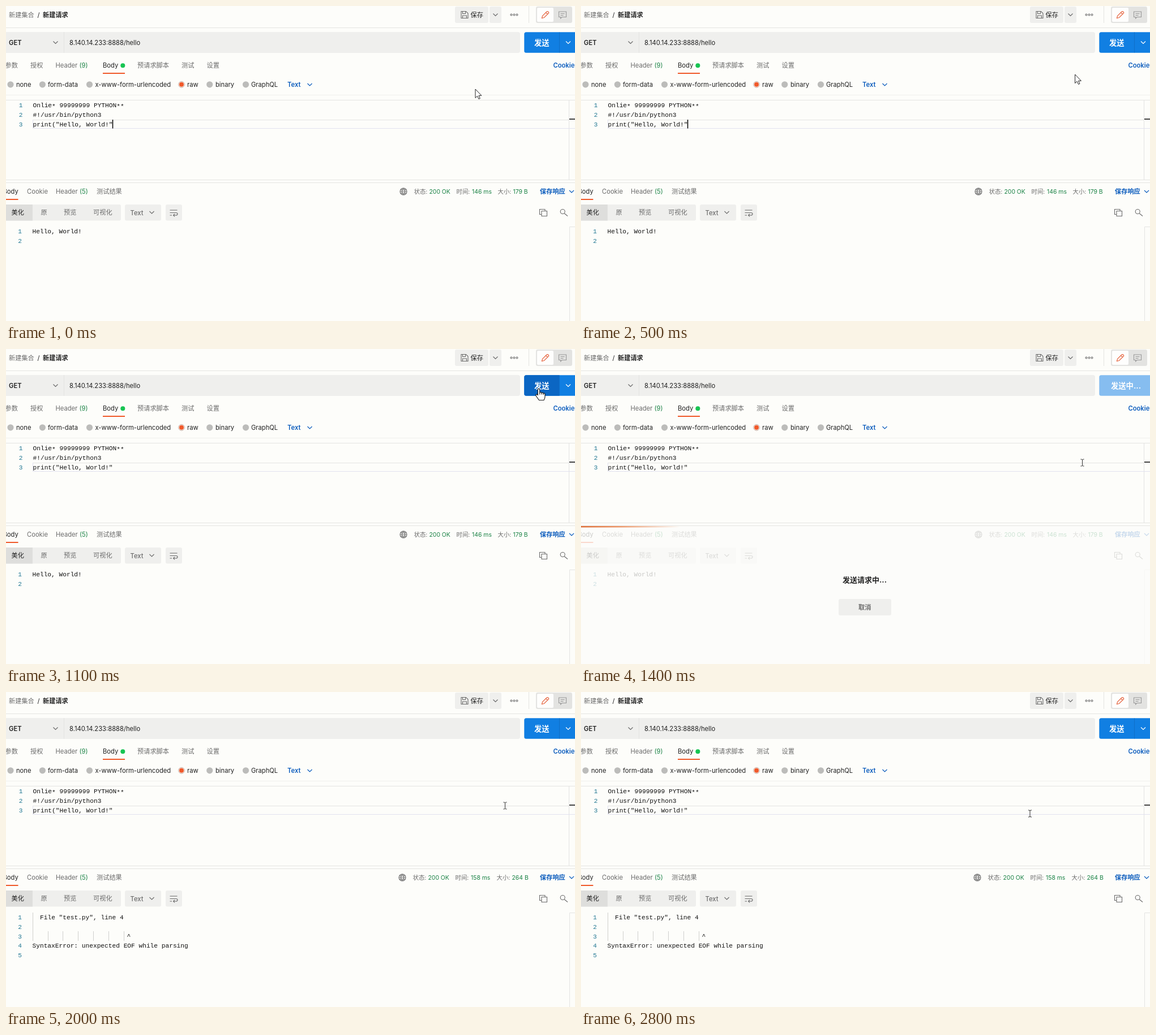
Animation, 1005 px wide and 557 px high, one loop 2900 ms. Source, as an HTML page:

```html
<!DOCTYPE html>
<html lang="zh-CN">
<head>
<meta charset="utf-8">
<style>
html, body { margin: 0; width: 100%; height: 100%; overflow: hidden; background: #fdfdfa; }
svg { display: block; width: 1005px; height: 557px; }
text { font: 11.2px Inter, "Noto Sans CJK SC", "Noto Sans CJK", sans-serif; fill: #6b6b6b; white-space: pre; }
.dark { fill: #212121; }
.bold { font-weight: 600; }
.blue { fill: #0b5cbd; font-weight: 600; }
.green { fill: #1a8245; }
.big { font-size: 13.3px; font-weight: 700; }
.white { fill: #fff; }
.small text { font-size: 10.4px; }
.code text { font: 11.2px "Liberation Mono", monospace; fill: #111; }
.code .num { fill: #237893; text-anchor: end; }
.line { stroke: #e4e4e2; fill: none; }
.icon { stroke: #6b6b6b; fill: none; stroke-width: 1.1; }
.panel { fill: #efefed; }
.orange { fill: #f0592a; }
</style>
</head>
<body>
<svg viewBox="0 0 1005 557">
  <defs>
    <path id="chev" d="M-4-2L0 2L4-2" fill="none" stroke-width="1.2"/>
    <linearGradient id="glow">
      <stop offset="0" stop-color="#e0713a"/>
      <stop offset=".4" stop-color="#ee9a6c"/>
      <stop offset="1" stop-color="#fdfdfa"/>
    </linearGradient>
  </defs>

  <!-- title row -->
  <text x="5" y="20">新建集合</text>
  <text x="55.5" y="20" class="dark">/</text>
  <text x="65" y="20" class="dark bold">新建请求</text>
  <rect x="793" y="1" width="59" height="29" rx="3" class="panel"/>
  <rect x="854" y="1" width="21" height="29" rx="3" class="panel"/>
  <path class="icon" d="M804 9.500H812.500L816 13V21.500H804ZM806.500 9.500V13.500H811.500V9.500M806.500 21.500V17H813.500V21.500"/>
  <text x="820.500" y="19.500" class="dark">保存</text>
  <use href="#chev" x="864.500" y="15.500" stroke="#6b6b6b"/>
  <g class="icon"><circle cx="892.500" cy="15.500" r="1.500"/><circle cx="897.500" cy="15.500" r="1.500"/><circle cx="902.500" cy="15.500" r="1.500"/></g>
  <path class="line" d="M923.500 0V30M0 38.500H1005"/>
  <rect x="936" y="1" width="64" height="29" rx="3" fill="#e3e3e1"/>
  <rect x="938" y="3" width="29" height="25" rx="2" fill="#fefefd"/>
  <path class="icon" style="stroke:#e5603a" d="M946.500 21.500L947.500 17.500L955 10Q956.500 9 958 10.500T958 13L950.500 20.500ZM953.500 11.500L956.500 14.500"/>
  <path class="icon" style="stroke:#999" d="M976.500 10H989.500V19.500H982L979.500 22V19.500H976.500ZM979.500 13.500H986.500M979.500 16.500H984.500"/>

  <!-- address row -->
  <rect x="-4" y="46" width="912" height="37" rx="4" class="panel"/>
  <path class="line" d="M102.500 46V83"/>
  <text x="5" y="69" class="dark bold">GET</text>
  <use href="#chev" x="87.500" y="64.500" stroke="#6b6b6b"/>
  <text x="112" y="68.500" class="dark">8.140.14.233:8888/hello</text>
  <g id="ready">
    <rect x="915.300" y="46.300" width="94" height="36.500" rx="3.500" fill="#117fe2"/>
    <path id="hover" d="M919 46.300H977V82.800H919Q915.300 82.800 915.300 79V50Q915.300 46.300 919 46.300" fill="#0b66c3"/>
    <path d="M977.500 46.500V82.500" stroke="#0f6fc8"/>
    <text x="933" y="69.500" class="big white">发送</text>
    <use href="#chev" x="993" y="64.500" stroke="#fff"/>
  </g>
  <g id="busy">
    <rect x="915.300" y="46.300" width="94" height="36.500" rx="3.500" fill="#86bdf0"/>
    <text x="936" y="69.500" class="big white">发送中...</text>
  </g>

  <!-- request tabs -->
  <text x="-1.400" y="109">参数</text>
  <text x="43" y="109">授权</text>
  <text x="87.500" y="109">Header <tspan class="green">(9)</tspan></text>
  <text x="171" y="109" class="dark">Body</text>
  <circle cx="206.300" cy="105.300" r="4" fill="#18c453"/>
  <text x="232" y="109">预请求脚本</text>
  <text x="310" y="109">测试</text>
  <text x="354.500" y="109">设置</text>
  <text x="966.500" y="109" class="blue">Cookie</text>
  <rect x="171" y="118" width="39" height="2" class="orange"/>

  <g fill="#bcbcba">
    <circle cx="8" cy="138.800" r="5.600"/><circle cx="64.400" cy="138.800" r="5.600"/>
    <circle cx="147.500" cy="138.800" r="5.600"/><circle cx="359.700" cy="138.800" r="5.600"/>
    <circle cx="423.500" cy="138.800" r="5.600"/>
  </g>
  <circle cx="310" cy="138.800" r="5.300" fill="#fff" stroke="#c4a294"/>
  <circle cx="310" cy="138.800" r="4" class="orange"/>
  <text x="18" y="143" class="dark">none</text>
  <text x="74" y="143" class="dark">form-data</text>
  <text x="157.500" y="143" class="dark">x-www-form-urlencoded</text>
  <text x="320" y="143" class="dark">raw</text>
  <text x="370" y="143" class="dark">binary</text>
  <text x="433" y="143" class="dark">GraphQL</text>
  <text x="497" y="143" class="blue">Text</text>
  <use href="#chev" x="536.500" y="139" stroke="#0b5cbd"/>

  <!-- request editor -->
  <path class="line" d="M0 157.500H1005" opacity=".5"/>
  <path class="line" d="M0 166.500H1005M47.500 201.500H994M994.500 167V307M0 307.500H1005M0 312.500H1005"/>
  <path d="M47.500 201V216.500H1005" fill="none" stroke="#e2e2f0"/>
  <path d="M995 200H1005" stroke="#444" stroke-width="2"/>
  <g class="code">
    <text x="29.500" y="179" class="num">1</text>
    <text x="47.500" y="179">Onlie<tspan dy="2">*</tspan><tspan dy="-2"> 99999999 PYTHON</tspan><tspan dy="2">**</tspan></text>
    <text x="29.500" y="195.500" class="num">2</text><text x="47.500" y="195.500">#!/usr/bin/python3</text>
    <text x="29.500" y="212.500" class="num">3</text><text x="47.500" y="212.500">print("Hello, World!"</text>
  </g>
  <path id="caret" d="M188.500 201V216.500" stroke="#000" stroke-width="1.500"/>

  <!-- response -->
  <text x="-5.500" y="332" class="dark">Body</text>
  <rect x="0" y="341" width="21.500" height="2" class="orange"/>
  <text x="37" y="332">Cookie</text>
  <text x="88" y="332">Header <tspan class="green">(5)</tspan></text>
  <text x="160" y="332">测试结果</text>
  <g id="stats" class="small">
    <path class="icon" d="M696 328A6 6 0 0 1 708 328A6 6 0 0 1 696 328H708M702 322Q696.500 328 702 334Q707.500 328 702 322M697 325H707M697 331H707"/>
    <text x="720.500" y="332">状态:</text><text x="747.500" y="332" class="green">200 OK</text>
    <text x="795.500" y="332">时间:</text><text id="time" x="823" y="332" class="green"></text>
    <text x="868.500" y="332">大小:</text><text id="size" x="895.500" y="332" class="green"></text>
  </g>
  <text x="943" y="332" class="blue">保存响应</text>
  <use href="#chev" x="999" y="328" stroke="#0b5cbd"/>

  <rect x="-4" y="351" width="207" height="28.500" rx="3" class="panel"/>
  <rect x="0" y="351" width="47" height="28.500" fill="#dededc"/>
  <rect x="210" y="351" width="64" height="28.500" rx="3" class="panel"/>
  <rect x="282" y="351" width="29" height="28.500" rx="3" class="panel"/>
  <text x="9.500" y="368.500" class="dark">美化</text>
  <text x="61.500" y="368.500">原</text>
  <text x="102" y="368.500">预览</text>
  <text x="154" y="368.500">可视化</text>
  <text x="219.500" y="369.500" style="font-weight:500">Text</text>
  <use href="#chev" x="257.500" y="365" stroke="#6b6b6b"/>
  <path class="icon" d="M289.500 361H302.500M289.500 365.500H300Q303 365.500 303 367.700T300 370H296M298 367.700L295.500 370L298 372.300M289.500 370H293"/>
  <path class="icon" d="M946 368.500H942.500V359.500H952V362.500M946 362.500H955.500V371.500H946Z"/>
  <path class="icon" d="M987.200 363.500A4 4 0 1 0 979.200 363.500A4 4 0 1 0 987.200 363.500M986 366.500L992 371.500"/>
  <path class="line" d="M1005 390.500H995.500V557"/>

  <g id="before" class="code">
    <text x="28" y="402" class="num">1</text><text x="46.500" y="402">Hello, World!</text>
    <text x="28" y="418.500" class="num">2</text>
  </g>
  <g id="after" class="code">
    <path d="M47.500 390V440M74.500 423V440M100.500 423V440M127.500 423V440M154.500 423V440M181.500 423V440M208.500 423V440" stroke="#d0d0ce"/>
    <text x="28" y="402" class="num">1</text><text x="60" y="402">File "test.py", line 4</text>
    <text x="28" y="418.500" class="num">2</text>
    <text x="28" y="435.500" class="num">3</text><text x="213.500" y="435">^</text>
    <text x="28" y="452" class="num">4</text><text x="46.500" y="452">SyntaxError: unexpected EOF while parsing</text>
    <text x="28" y="469" class="num">5</text>
  </g>

  <!-- sending overlay -->
  <g id="wait">
    <rect y="313" width="1005" height="244" fill="#fdfdfa" opacity=".78"/>
    <rect id="bar" y="313" height="2.500" fill="url(#glow)"/>
    <text x="501" y="413" class="big dark" style="font-size:13px" text-anchor="middle">发送请求中...</text>
    <rect x="455" y="442" width="93" height="29" rx="3" class="panel"/>
    <text x="501.200" y="460.500" class="bold" text-anchor="middle">取消</text>
  </g>

  <!-- pointers -->
  <g id="pointer" stroke="#222" fill="#fff" stroke-linejoin="round">
    <path id="arrow" d="M0 0V15.500L3.500 12.200L6 17.500L8.300 16.400L6 11.300H10.800Z"/>
    <path id="hand" stroke-width="1.200" d="M-1.600 1.200Q0-1 1.600 1.200V7Q3.500 5.500 4.800 7.500Q6.800 6.300 8 8.500Q10.500 7.500 11 10V14Q11 17 9 20.500H.5L-4.800 13Q-5.500 9.800-3.300 10L-1.600 11.700ZM1.600 7V10.500M4.800 7.500V10.500M8 8.500V11"/>
    <path id="beam" fill="none" stroke="#333" d="M-3-6H-1L0-5L1-6H3M0-5V5M-3 6H-1L0 5L1 6H3"/>
  </g>
</svg>
<script>
const $ = id => document.getElementById(id);
const show = (id, on) => $(id).style.display = on ? "" : "none";

// time in ms, x, y
const path = [
  [0, 829, 147], [300, 829, 147], [800, 938, 82], [1100, 941, 70], [1200, 941, 74],
  [1400, 885.5, 201], [2000, 881.5, 201], [2400, 799, 215], [2800, 793, 215]
];

function place(t) {
  const i = Math.max(1, path.findIndex(p => p[0] >= t));
  const [t0, x0, y0] = path[i - 1], [t1, x1, y1] = path[i];
  const k = (t - t0) / (t1 - t0);
  return [x0 + (x1 - x0) * k, y0 + (y1 - y0) * k];
}

function draw(now) {
  const t = Math.floor(now % 2900 / 100) * 100;
  const busy = t >= 1200 && t < 1600, done = t >= 1600;
  show("ready", !busy);
  show("busy", busy);
  show("wait", busy);
  show("hover", t >= 900 && t < 1200);
  show("caret", t < 700);
  show("before", !done);
  show("after", done);
  $("bar").setAttribute("width", Math.max(0, (t - 1200) * .875));
  $("stats").setAttribute("transform", `translate(${done ? -2 : 0})`);
  $("time").textContent = done ? "158 ms" : "146 ms";
  $("size").textContent = done ? "264 B" : "179 B";
  show("arrow", t < 800 || t === 1200);
  show("hand", t >= 800 && t < 1200);
  show("beam", t >= 1300);
  $("pointer").setAttribute("transform", `translate(${place(t)})`);
  requestAnimationFrame(draw);
}
requestAnimationFrame(draw);
</script>
</body>
</html>
```
